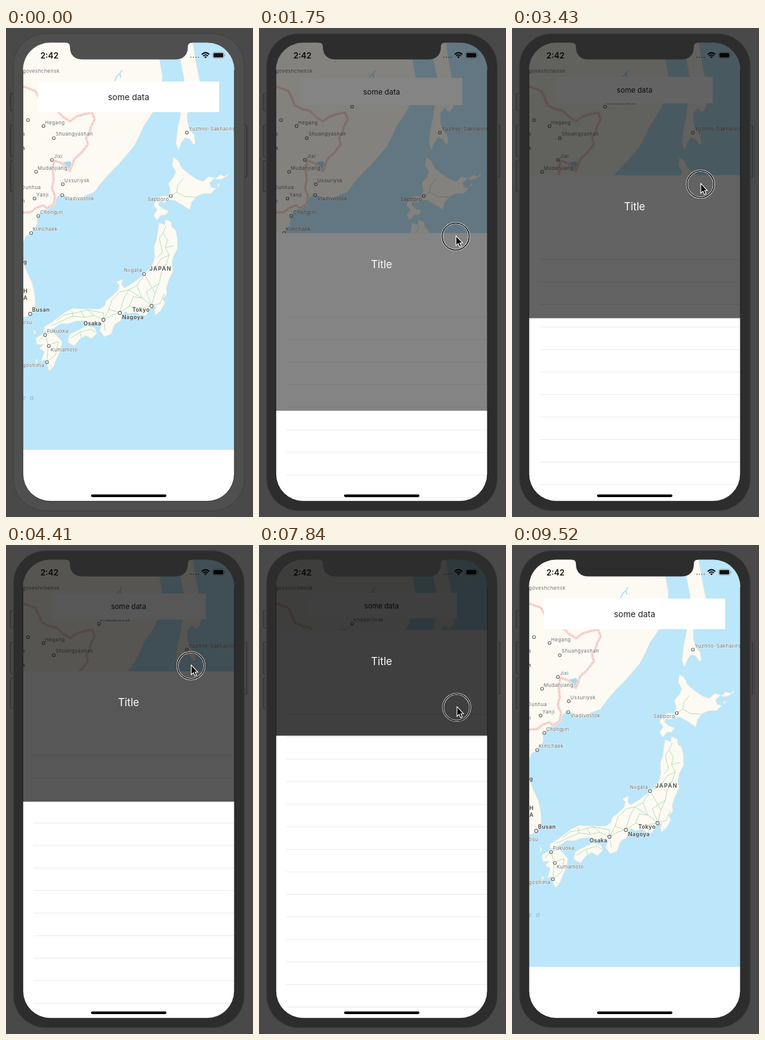
Write an HTML page that moves like this. It is 398 px wide and 786 px high and loops after 9.59 s.

```html
<!DOCTYPE html>
<html lang="en">
<head>
<meta charset="utf-8">
<title>Pull-up sheet over a map</title>
<style>
  html, body { margin: 0; width: 100%; height: 100%; overflow: hidden; background: #494949; }
  svg { display: block; width: 100vw; height: 100vh; }
  text { font-family: Inter, Roboto, sans-serif; }
  .land { fill: #fcfaf2; stroke: #f1efe2; stroke-width: .8; stroke-linejoin: round; }
  .road { fill: none; stroke: #b5dfbd; stroke-width: 1; stroke-linejoin: round; }
  .halo { fill: none; stroke: #f8dfd9; stroke-width: 4.5; stroke-linejoin: round; }
  .border { fill: none; stroke: #e5b3ae; stroke-width: 1; stroke-dasharray: 5 1.5; }
  #labels text { font-size: 7.8px; letter-spacing: .5px; fill: #6d6d6d; stroke: #fff; stroke-width: 1.2px; stroke-opacity: .7; paint-order: stroke; }
  #labels .city { font-size: 8.8px; font-weight: 600; letter-spacing: .4px; fill: #444; }
  #labels circle { fill: #fff; stroke: #666; stroke-width: 1.1; }
  #lines path { stroke: #e9e9eb; stroke-width: 1; }
  .button { fill: #464646; stroke: #303030; stroke-width: 1.2; }
</style>
</head>
<body>
<svg viewBox="0 0 398 786" preserveAspectRatio="none">
  <defs>
    <clipPath id="screen"><rect x="26" y="23" width="343" height="739" rx="38"/></clipPath>
    <clipPath id="mapArea"><rect x="26" y="22" width="344" height="656"/></clipPath>
  </defs>

  <rect width="398" height="786" fill="#494949"/>
  <g class="button">
    <rect x="7" y="105" width="8" height="28" rx="2"/>
    <rect x="7" y="156" width="8" height="51" rx="2"/>
    <rect x="7" y="213" width="8" height="50" rx="2"/>
    <rect x="380" y="156" width="8" height="84" rx="2"/>
  </g>
  <rect x="11" y="8" width="374" height="769" rx="54" fill="#424242"/>

  <g clip-path="url(#screen)">
    <rect x="26" y="22" width="344" height="740" fill="#fff"/>

    <g clip-path="url(#mapArea)">
      <rect x="26" y="22" width="344" height="656" fill="#bce6f9"/>
      <g class="land">
        <!-- Continent and peninsula -->
        <path d="M20 20H250L247 50 252 78 248 106 241 128 231 144 222 157 214 175 206 190 195 203 183 217 168 232 153 249 142 264 130 268 118 275 105 276 96 269 88 267 82 272 78 281 70 290 60 292 50 303 50 316 40 330 31 335 27 346 20 350Z"/>
        <path d="M20 372 29 378 33 391 42 410 46 428 47 445 43 457 33 464 20 467Z"/>
        <!-- Northern islands -->
        <path d="M277 20 280 45 287 80 288 102 284 120 281 142 277 160 274 185 278 196 282 185 288 176 296 178 302 187 305 185 303 172 296 164 292 150 292 137 299 129 307 135 313 127 316 108 311 80 306 55 300 20Z"/>
        <path d="M270 208 277 213 283 225 295 235 307 243 318 247 326 239 336 241 328 249 330 256 338 258 330 266 318 266 308 270 299 280 296 292 284 284 272 277 262 276 254 281 249 277 245 284 253 291 262 294 257 300 249 301 243 309 238 301 244 292 238 285 241 276 252 270 262 271 265 261 262 250 270 240 274 231 268 221Z"/>
        <path d="M337 243 345 236 352 239 358 234 356 238 347 243ZM340 253 345 250 342 255Z"/>
        <!-- Main island -->
        <path d="M247 313 256 317 257 308 266 312 267 320 273 325 276 338 276 355 270 366 267 378 269 391 262 405 258 418 259 428 252 435 256 442 249 454 241 461 238 455 243 447 236 448 230 452 226 462 218 462 209 457 198 459 192 455 186 462 185 470 175 476 169 492 158 496 151 486 155 475 148 471 138 474 125 470 112 471 101 475 88 475 78 482 68 486 61 488 62 480 70 476 82 467 95 457 108 451 130 452 150 452 159 447 162 438 172 430 181 421 183 413 178 408 188 404 186 413 191 418 206 409 218 400 229 389 237 379 240 367 239 350 243 340 245 325Z"/>
        <path d="M102 493 116 486 130 479 143 482 146 491 138 499 128 494 119 500 110 511 100 505Z"/>
        <path d="M48 499 60 491 73 487 82 495 90 504 88 518 82 530 77 543 70 551 66 541 63 532 57 536 62 520 54 515 61 508 50 509Z"/>
        <path d="M45 485 48 489 46 493ZM47 535 51 532 50 538ZM172 406 174 410Z"/>
      </g>
      <path d="M92 216 103 214 109 221 103 231 97 229Z" fill="#a8d9ef"/>
      <path d="M187 68 183 74 179 77 175 85M184 74 185 80" fill="none" stroke="#b5e2f6" stroke-width="2"/>
      <g id="borders"></g>
      <g class="road">
        <path d="M265 270 275 264 277 252 286 242M275 264 288 271 306 272M265 270 253 279"/>
        <path d="M258 318 253 330 260 340 257 353 263 365 258 380 250 394 247 410 240 426 235 446M253 330 247 338 252 360 245 368M257 353 270 350M263 365 250 371 243 382 223 396 231 410 240 426M258 380 239 390"/>
        <path d="M223 396 211 414 198 421 190 435 183 458 199 447 216 451 235 446 219 434 211 414M219 434 198 421 184 424 171 437 166 452 183 458 171 461 157 469 166 452M235 446 226 424 247 410M235 446 248 443 255 427M199 447 205 432 219 434M235 446 240 458M216 451 221 461"/>
        <path d="M157 469 142 462 126 465 108 463 90 471 72 479M142 462 131 453 112 458 93 461 82 470M126 465 120 454M108 463 106 454M157 469 160 486M131 453 157 458 157 469"/>
        <path d="M104 499 119 489 137 484 144 489M119 489 122 499M63 493 73 489M63 493 68 510 66 537 74 545M63 493 53 503M68 510 84 504 80 525 66 537"/>
      </g>
      <g id="labels"></g>
    </g>

    <!-- Card -->
    <g id="card">
      <rect x="-146" y="-24.6" width="292" height="49.2" fill="#fff"/>
      <text y="5" text-anchor="middle" font-size="13.5" fill="#222">some data</text>
    </g>

    <!-- Status bar -->
    <text x="55.5" y="48.6" font-size="13" font-weight="600" fill="#111">2:42</text>
    <path d="M297 47h2m2 0h2m2 0h2m2 0h2" stroke="#999" stroke-width="2"/>
    <path d="M315.3 42.6Q321.5 36.6 327.7 42.6M317.6 45Q321.5 41.4 325.4 45" fill="none" stroke="#111" stroke-width="2"/>
    <path d="M319.4 46.5Q321.5 44.6 323.6 46.5L321.5 48.8Z" fill="#111"/>
    <rect x="332.9" y="38.9" width="18.4" height="9.6" rx="2.6" fill="none" stroke="#999" stroke-width=".8"/>
    <rect x="334.3" y="40.2" width="15.7" height="7" rx="1.5" fill="#111"/>
    <path d="M352.8 42.3v3" stroke="#999"/>

    <!-- Sheet -->
    <g id="sheet">
      <rect x="26" width="344" height="800" fill="#fff"/>
      <g id="lines"></g>
    </g>
    <rect id="dim" x="26" y="22" width="344" height="740"/>
    <text id="title" x="197.5" text-anchor="middle" font-size="16.6" fill="#fff">Title</text>
    <rect x="137" y="749.7" width="121.5" height="4.2" rx="2.1"/>
  </g>

  <!-- Bezel with a screen-shaped hole, then the notch -->
  <g id="bezel">
    <path fill-rule="evenodd" d="M64 9.5H332A51.5 51.5 0 0 1 383.5 61V724A51.5 51.5 0 0 1 332 775.5H64A51.5 51.5 0 0 1 12.5 724V61A51.5 51.5 0 0 1 64 9.5Z
      M71 23.5A44 44 0 0 0 27.2 67.5V717A44 44 0 0 0 71 760.7H324A44 44 0 0 0 368 717V67.5A44 44 0 0 0 324 23.5Z"/>
    <path d="M96 22V23.5Q103 23.5 103 30Q103 50.5 124 50.5H272Q293 50.5 293 30Q293 23.5 300 23.5V22Z"/>
  </g>
  <path d="M27.2 67.5V717A44 44 0 0 0 71 760.7H324A44 44 0 0 0 368 717V67.5" fill="none" stroke="#151515" stroke-width=".8"/>

  <g id="pointer">
    <circle r="21.7" fill="none" stroke="#fff" stroke-width="3"/>
    <circle r="21.7" fill="none" stroke="#000" stroke-width="1.5"/>
    <path d="M.5 -1V14.5L4 11.3 6.4 16.8 9 15.6 6.7 10.3H11Z" stroke="#fff" stroke-width="1.1"/>
  </g>
</svg>
<script>
const $ = id => document.getElementById(id);
const LOOP = 9590, REST = 678, TOP = 21.6, FOCUS = 70;

// Map borders: soft halo below, dashed line above
const frontier = 'M22 92 36 97 47 101 53 112 57 124 69 130 82 133 92 143 103 150 114 142 128 138 139 136 143 147 137 158 134 170 129 176 132 187 121 201 110 211 103 230 91 218 78 213 75 226 77 244 74 258 79 270 77 283 66 290 60 285 49 289 40 296 22 297';
$('borders').innerHTML = ['halo', 'border'].map(c => `<path class="${c}" d="${frontier}"/>`).join('');

// name, text x, baseline, optional marker x, y
const towns = [
  ['goveshchensk', 27, 72], ['Khabarovsk', 152, 123, 150, 126.5],
  ['Hegang', 63, 155, 60.5, 157.5], ['Shuangyashan', 80, 173, 77, 177],
  ['Jixi', 77, 209, 74, 212], ['Mudanjiang', 51, 228, 48.5, 231],
  ['Ussuriysk', 94, 248, 91.5, 251], ['Dunhua', 25, 259],
  ['Yanji', 49, 271, 46, 274], ['Vladivostok', 94, 277, 90.5, 268.5],
  ['Chongjin', 55, 299, 52, 302], ['Kimchaek', 43, 326, 40.5, 329.5],
  ['Yuzhno-Sakhalinsk', 294.5, 164.5, 291.5, 168], ['Sapporo', 228, 278, 265.5, 270],
  ['Niigata', 190, 392, 222.5, 395.5], ['Fukuoka', 66, 490, 63, 493.5],
  ['Kumamoto', 72, 520, 69, 511], ['goshima', 27, 545, 66, 537],
  ['osu', 27, 476], ['a', 26, 173], ['n', 26, 281], ['', 0, 0, 35.5, 148]
];
const cities = [
  ['JAPAN', 231, 389.5], ['Tokyo', 203.5, 455.5, 234.5, 447], ['Nagoya', 187, 468, 183.5, 458],
  ['Osaka', 125, 478, 157, 469], ['Busan', 42, 456, 39, 459.5],
  ['g', 28, 379], ['H', 28, 426], ['A', 28, 437], ['n', 25, 196]
];
const label = (cls, r) => ([name, x, y, cx, cy]) =>
  `<text class="${cls}" x="${x}" y="${y}"${name === 'JAPAN' ? ' style="letter-spacing:1.3px"' : ''}>${name}</text>` +
  (cx ? `<circle cx="${cx}" cy="${cy}" r="${r}"/>` : '');
$('labels').innerHTML = towns.map(label('town', 2.3)).join('') + cities.map(label('city', 2.6)).join('') +
  '<text x="26" y="598" style="font-size:10px;font-style:italic;letter-spacing:2px;fill:#86b5cc;stroke:none">e a</text>';

$('lines').innerHTML = Array.from({ length: 17 }, (_, i) =>
  `<path d="M44 ${(i * 36.2).toFixed(1)}H369"/>`).join('');

const linear = p => p;
const smooth = p => p * p * (3 - 2 * p);
const out = p => 1 - (1 - p) ** 3;

// Keys are [time, values, easing into the key]
function sample(keys, t) {
  const i = keys.findIndex(k => k[0] > t);
  if (i < 0) return keys[keys.length - 1][1];
  if (!i) return keys[0][1];
  const [t0, a] = keys[i - 1], [t1, b, ease = linear] = keys[i];
  const p = ease((t - t0) / (t1 - t0));
  return a.map((v, n) => v + (b[n] - v) * p);
}

const sheetKeys = [
  [0, [REST]], [420, [REST]], [1260, [369], smooth], [2520, [268]], [4410, [203]],
  [4900, [27], smooth], [5700, [TOP], out], [7390, [TOP]], [7840, [136]],
  [8260, [430]], [8960, [REST], out]
];
const pointerKeys = [
  [0, [345, 815]], [420, [338, 700], out], [1260, [322, 355], smooth], [2520, [309, 304]],
  [4410, [298, 194]], [4900, [284, 92], smooth], [5880, [267, 160], smooth],
  [6090, [266, 334], smooth], [6230, [266, 334]], [7140, [338, 134], smooth],
  [7350, [340, 98], smooth], [7420, [340, 98]], [7840, [318.5, 260.3]],
  [8400, [330, 610]], [8960, [336, 690], out], [9060, [336, 690]], [9520, [340, 815], smooth]
];

function draw(t) {
  const [y] = sample(sheetKeys, t);
  const raised = REST - y;
  const nearTop = Math.max(0, (136 - y) / (136 - TOP));
  const [px, py] = sample(pointerKeys, t);

  $('bezel').setAttribute('fill', t < FOCUS ? '#4f4f4f' : '#2d2d2d');
  $('card').setAttribute('transform', `translate(197.5 ${110.6 - raised * .0245}) scale(${1 - raised * .000311})`);
  $('sheet').setAttribute('transform', `translate(0 ${y})`);
  $('lines').setAttribute('transform', `translate(0 ${135.3 + 19.2 * nearTop})`);
  $('dim').setAttribute('height', y * 1.6 + 87.8 - 22);
  $('dim').setAttribute('opacity', Math.min(1, raised * .00139 + .088 * nearTop));
  $('title').setAttribute('y', y + 56.5);
  $('pointer').setAttribute('transform', `translate(${px} ${py})`);
}

const start = performance.now();
function tick() {
  draw((performance.now() - start) % LOOP);
  requestAnimationFrame(tick);
}
draw(0);
requestAnimationFrame(tick);
</script>
</body>
</html>
```
